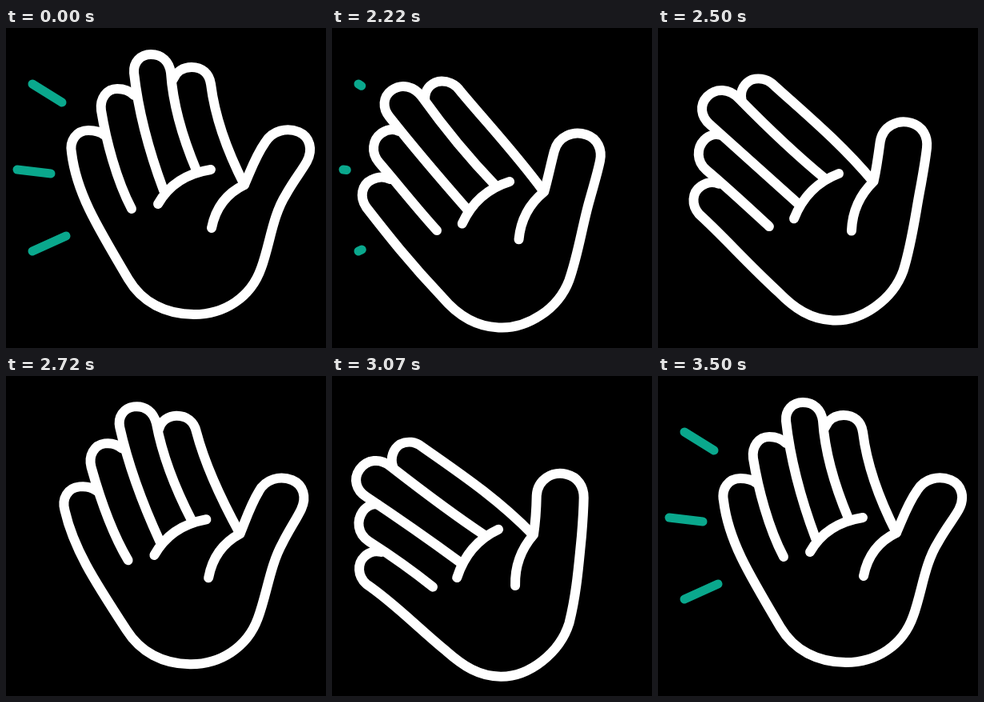
These frames come from a looping animation (400x400 px, 3520 ms). An HTML page:

```html
<!DOCTYPE html>
<html lang="en">
<head>
<meta charset="utf-8">
<title>Waving hand</title>
<style>
  html, body { margin: 0; width: 100%; height: 100%; overflow: hidden; background: #000; }
  svg { display: block; width: 100vw; height: 100vh; }
  path { fill: none; stroke-linecap: round; stroke-linejoin: round; }
  #hand path { stroke: #fff; stroke-width: 12; }
  #rays path { stroke: #0aa88d; stroke-width: 11; }
</style>
</head>
<body>
<svg viewBox="0 0 400 400">
  <g id="hand"></g>
  <g id="rays"></g>
</svg>
<script>
const LOOP = 3520, START = 2020, TILT = 18, REACH = 7;
const PIVOT = [257, 250], BENT_PIVOT = [224, 267];

// Each line of the hand: open pose, bent pose
const LINES = [
  // palm, little finger tip and thumb
  ['M123,134 C117,129 110,128 103,128 C88,128 79,141 82,156 C88,205 112,245 153,314 C170,343 200,358 235,358 C273,358 306,337 319,300 C330,270 333,235 350,208 C360,190 370,178 376,167 C384,152 380,136 366,130 C351,124 333,128 324,143 C312,160 306,178 298,196 C275,207 262,225 257,250',
   'M57,228 C50,226 42,228 36,234 C27,243 28,258 39,268 C73,290 100,318 139,350 C160,368 180,381 207,381 C243,381 281,350 292,313 C301,275 303,240 306,205 C307,190 308,172 308,156 C308,142 300,130 286,127 C268,123 250,134 249,154 C249,172 248,188 246,203 C230,222 223,242 224,267'],
  // ring finger
  ['M157,226 C138,190 125,140 119,103 C117,88 126,76 139,76 C148,76 155,79 160,84',
   'M121,270 C98,252 72,234 41,215 C27,206 25,190 33,178 C38,171 45,168 51,169'],
  // middle finger
  ['M197,203 C181,160 166,110 160,56 C159,43 168,33 181,33 C195,33 204,42 206,56 C209,100 222,140 238,178',
   'M155,239 C118,213 78,186 37,160 C24,152 20,138 28,126 C37,113 53,111 66,121 C105,150 143,178 184,204'],
  // index finger
  ['M209,64 C213,54 222,49 232,49 C245,49 254,57 256,70 C261,110 277,155 298,196',
   'M69,121 C65,110 69,99 77,93 C86,88 96,89 104,95 C150,126 200,158 245,203'],
  // palm crease
  ['M190,220 C203,197 224,182 256,177',
   'M151,258 C160,229 177,209 202,197']
];

// Outer end, inner end
const RAYS = [[33, 70, 70, 93], [14, 177, 56, 182], [33, 279, 75, 260]];

// time, value, power that skews the ease
const SWING = [[2000, 0], [2380, 1.22, 1.5], [2650, 0.03, 1], [3000, 1.22, 1.25], [3450, 0, 0.65]];
const PUSH = [[2000, 0], [2260, 1.05], [2490, 0], [2650, 0], [2950, 1.05], [3220, 0]];
const SHRINK = [[1978, 0], [2281, 1]];
const GROW = [[3100, 0], [3450, 1]];

const mix = (a, b, k) => a + (b - a) * k;
const clamp = u => Math.min(1, Math.max(0, u));
const smooth = u => u * u * (3 - 2 * u);

function track(keys, t) {
  if (t <= keys[0][0]) return keys[0][1];
  for (let i = 1; i < keys.length; i++) {
    const [t0, v0] = keys[i - 1], [t1, v1, power = 1] = keys[i];
    if (t < t1) return mix(v0, v1, smooth(((t - t0) / (t1 - t0)) ** power));
  }
  return keys[keys.length - 1][1];
}

// Points relative to a pivot, turned by an angle in degrees
function points(d, [px, py], angle) {
  const c = Math.cos(angle * Math.PI / 180), s = Math.sin(angle * Math.PI / 180);
  return d.match(/[\d.]+,[\d.]+/g).map(p => {
    const [x, y] = p.split(',').map(Number);
    return [(x - px) * c - (y - py) * s, (x - px) * s + (y - py) * c];
  });
}

// How far a point stretches away from the pivot: only the fingers do
function reachOf([x, y]) {
  const r = Math.hypot(x, y);
  return r && y < 0 ? REACH * Math.max(0, r - 100) / 100 * clamp(-x / 60) / r : 0;
}

function addPath(id) {
  const el = document.createElementNS('http://www.w3.org/2000/svg', 'path');
  document.getElementById(id).appendChild(el);
  return el;
}

const hand = document.getElementById('hand');
const lines = LINES.map(([openPath, bentPath]) => {
  const open = points(openPath, PIVOT, 0);
  return {
    el: addPath('hand'),
    open,
    bent: points(bentPath, BENT_PIVOT, TILT),
    reach: open.map(reachOf)
  };
});
const rays = RAYS.map(ends => ({ el: addPath('rays'), ends }));

function drawHand(t) {
  const swing = track(SWING, t), push = track(PUSH, t);
  const bend = swing * (1.75 - 0.75 * swing);
  const stretch = Math.max(0, 4 * swing * (1 - swing));
  const x = PIVOT[0] - 21 * swing - 13 * push;
  const y = PIVOT[1] + 5 * swing + 12 * push;
  hand.setAttribute('transform', `translate(${x} ${y}) rotate(${-TILT * swing})`);
  for (const { el, open, bent, reach } of lines) {
    const p = open.map((a, i) => {
      const k = 1 + reach[i] * stretch;
      return a.map((v, axis) => (mix(v, bent[i][axis], bend) * k).toFixed(2)).join(',');
    });
    el.setAttribute('d', `M${p[0]} C${p.slice(1).join(' ')}`);
  }
}

function drawRays(t) {
  const late = t > 2700;
  const from = late ? 1 - track(GROW, t) : 0;
  const to = late ? 1 : 1 - track(SHRINK, t);
  for (const { el, ends: [x0, y0, x1, y1] } of rays) {
    const at = k => `${mix(x0, x1, k)},${mix(y0, y1, k)}`;
    el.setAttribute('d', to - from > 0.002 ? `M${at(from)} L${at(to)}` : '');
  }
}

function draw(ms) {
  const now = ms % LOOP;
  const t = now < START ? 0 : now;
  drawHand(t);
  drawRays(t);
}

const begin = performance.now();
function tick() {
  draw(performance.now() - begin);
  requestAnimationFrame(tick);
}
tick();
</script>
</body>
</html>
```
